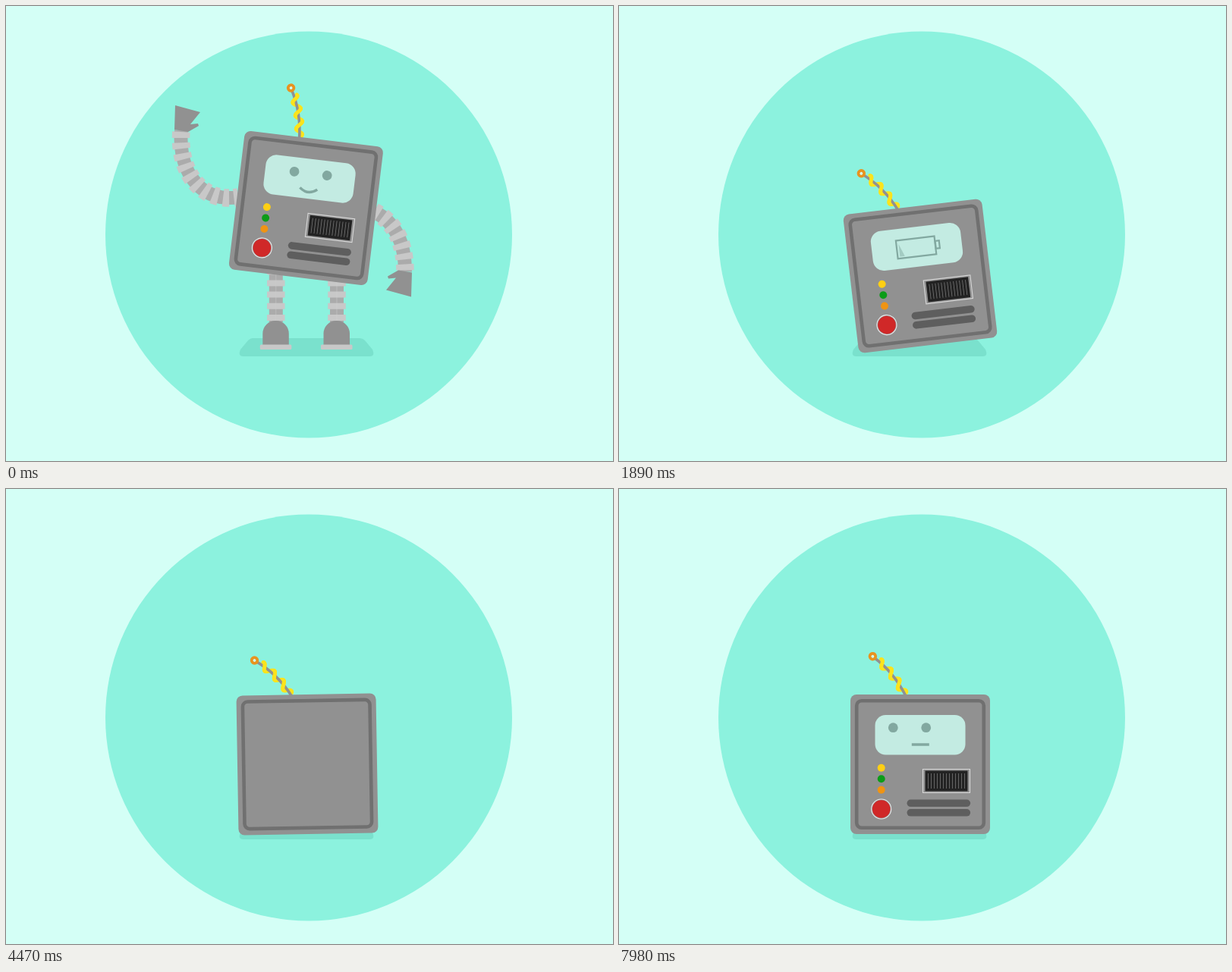
Write an HTML page with a canvas that moves like this. It is 800 px wide and 600 px high and loops after 8000 ms.

```html
<!DOCTYPE html>
<html>
<head>
<meta charset="utf-8">
<title>Robot running out of power</title>
<style>
html, body { margin: 0; width: 100%; height: 100%; overflow: hidden; background: #d4fff6; }
canvas { display: block; }
</style>
</head>
<body>
<canvas id="stage" width="800" height="600"></canvas>
<script>
const g = document.getElementById('stage').getContext('2d');
const LOOP = 8000, RAD = Math.PI / 180;
const GREY = '#919191', TUBE = '#ababab', RING = '#c8c8c8', INK = '#82a8a0';

const clamp = v => Math.max(0, Math.min(1, v));
const mix = (a, b, u) => a + (b - a) * u;
const span = (t, from, to) => clamp((t - from) / (to - from));
const sine = u => (1 - Math.cos(Math.PI * u)) / 2;
const backIn = u => u * u * (3.5 * u - 2.5);

// Eased value through [time, value] pairs
function keys(t, list) {
  let i = 0;
  while (i < list.length - 2 && t > list[i + 1][0]) i++;
  const [a, b] = [list[i], list[i + 1]];
  return mix(a[1], b[1], sine(span(t, a[0], b[0])));
}

function at(x, y, draw, angle = 0, sx = 1, sy = sx) {
  g.save();
  g.translate(x, y);
  g.rotate(angle * RAD);
  g.scale(sx, sy);
  draw();
  g.restore();
}

function fill(color) { g.fillStyle = color; g.fill(); }
function stroke(color, width) { g.strokeStyle = color; g.lineWidth = width; g.stroke(); }
function box(x, y, w, h, r = 0) { g.beginPath(); g.roundRect(x, y, w, h, r); }
function disc(x, y, rx, ry = rx) { g.beginPath(); g.ellipse(x, y, rx, ry, 0, 0, 7); }
function poly(points) {
  g.beginPath();
  points.forEach(p => g.lineTo(...p));
}

function scenery() {
  g.fillStyle = '#d4fff6';
  g.fillRect(0, 0, 800, 600);
  disc(399, 301.5, 268);
  fill('#8cf2de');
  g.beginPath();
  g.moveTo(325, 438);
  g.lineTo(466, 438);
  g.quadraticCurveTo(470, 438, 473, 441);
  g.lineTo(483, 453);
  g.quadraticCurveTo(487, 462, 479, 462);
  g.lineTo(313, 462);
  g.quadraticCurveTo(305, 462, 309, 453);
  g.lineTo(319, 441);
  g.quadraticCurveTo(322, 438, 325, 438);
  fill('#7ae1cd');
}

// Strokes the current path as a ribbed tube
function hose(gap) {
  stroke(TUBE, 18);
  g.setLineDash([8, gap]);
  g.lineDashOffset = -2;
  stroke(RING, 23.5);
  g.setLineDash([]);
}

function arm(p, c, d, wrist, handAngle) {
  g.beginPath();
  g.moveTo(...wrist);
  g.bezierCurveTo(...d, ...c, ...p);
  hose(6.2);
  at(...wrist, () => {
    poly([[-8, -33], [25, -24], [12, -8], [22, -9], [23, -6], [9, 2], [-9, -1]]);
    fill(GREY);
  }, handAngle);
}

function leg(x) {
  g.beginPath();
  g.moveTo(x, 417);
  g.lineTo(x, 335);
  hose(7.2);
  g.fillStyle = 'rgba(210,210,210,.5)';
  g.fillRect(x - .5, 335, 1, 80);
  box(x - 17.5, 415, 34.5, 33, [17, 17, 0, 0]);
  fill(GREY);
  box(x - 21, 446.5, 41.5, 6.5, 1.5);
  fill(RING);
}

function pose(t) {
  if (t < 1620) {
    const k = keys(t, [[0, 1], [870, 0], [1000, 0], [1440, 1.25], [1620, 1]]);
    return { k, x: 395.4, y: 256 + 10.5 * k, tilt: .3 + 6.6 * k };
  }
  if (t < 2430) {
    const tilt = keys(t, [[1620, 6.9], [1890, -6.7], [2070, 4], [2220, -2], [2330, 1], [2430, 0]]);
    const fall = span(t, 1620, 1860);
    const floor = 363 - 60 * Math.abs(Math.sin(tilt * RAD));
    return { k: 1, x: mix(395.4, 397, fall), y: mix(266.5, floor, fall * fall), tilt };
  }
  const shake = (from, to) => {
    const u = span(t, from, to);
    return 2.4 * (1 - .85 * u) * Math.sin(3 * Math.PI * u);
  };
  return { k: 1, x: 397, y: 363, tilt: shake(3570, 3900) + shake(4290, 4740) };
}

function antennaAngle(t) {
  if (t < 2430) return keys(t, [[0, 16], [870, 27.4], [1020, 27.4], [1440, 13], [1620, 16],
    [1980, 42], [2100, 50], [2260, 43], [2430, 46]]);
  const first = span(t, 3570, 3900), second = span(t, 4465, 4740);
  return 46 - 18 * Math.sin(Math.PI * first) - 14 * Math.sin(Math.PI * second) - 6.3 * sine(second);
}

function limbs(t, { k, x, y, tilt }) {
  const q = 1 - sine(span(t, 1620, 1830));
  if (q <= 0) return;
  const c = Math.cos(tilt * RAD), s = Math.sin(tilt * RAD);
  const joint = (a, b) => [x + a * c - b * s, y + a * s + b * c];
  const shrink = (p, draw) => at(...p, () => { g.translate(-p[0], -p[1]); draw(); }, 0, q);

  for (const lx of [355.8, 436]) shrink([lx, y + 80], () => leg(lx));

  const l = joint(-90, -4), r = joint(90, -6);
  const wx = keys(t, [[0, 231], [400, 198], [840, 221], [1020, 225], [1620, 240]]);
  const wy = keys(t, [[0, 164], [400, 172], [1020, 169], [1620, 167]]);
  const wave = keys(t, [[0, 0], [400, -6], [840, 0]]);
  shrink(l, () => arm(l, [l[0] - mix(47, 43, k), l[1] + mix(12, 9, k)],
    [wx - 5, wy + 61], [wx, wy], wave));

  const w = [mix(536, 526, k), mix(325, 350.5, k)];
  shrink(r, () => arm(r, [r[0] + 28, r[1] + mix(6, 14, k)],
    [w[0] - mix(5, 0, k), w[1] - 37], w, 180 - mix(5, 0, k)));
}

function antenna(angle) {
  const bulge = s => 16.8 * (s / 66) * (1 - s / 66);
  const turn = 17.3;
  const coil = (from, to) => {
    g.beginPath();
    for (let s = from; s <= to; s += .5)
      g.lineTo(bulge(s) + 4.3 * Math.cos((s - 3) / turn * 2 * Math.PI), -s);
    stroke('#fbe31c', 5);
  };
  g.lineCap = g.lineJoin = 'round';
  at(-20.5, -91.5, () => {
    coil(1, 56);
    g.beginPath();
    g.moveTo(0, 3);
    g.quadraticCurveTo(8.4, -33, 0, -65);
    stroke(GREY, 3.6);
    for (let i = 0; i < 3; i++) coil(3 + (i + .5) * turn, 3 + (i + 1) * turn);
    disc(0, -66, 3.8);
    fill('#d4fff6');
    stroke('#e8931f', 3.8);
  }, -angle);
  g.lineCap = 'butt';
  g.lineJoin = 'miter';
}

function battery(alpha) {
  g.globalAlpha = alpha;
  box(-26.5, -50, 51, 24);
  stroke(INK, 2.2);
  box(24.8, -43.5, 5.2, 10);
  stroke(INK, 2.2);
  poly([[-23.5, -45], [-23.5, -28.5], [-17, -28.5]]);
  fill('#a3cbc2');
  g.globalAlpha = 1;
}

function face(t) {
  const early = t < 2430;
  const enter = early ? 1 : sine(span(t, 6030, 6330));
  g.globalAlpha = early ? 1 - span(t, 430, 560) : enter;
  if (!g.globalAlpha) { g.globalAlpha = 1; return; }
  const look = sine(span(t, 6990, 7320)), back = sine(span(t, 7680, 7980));
  const blink = from => 1 - .9 * Math.sin(Math.PI * span(t, from, from + 270)) ** 3;
  const dx = 8 * look - 22.7 * back;
  const dy = -2.3 * look - 6.5 * (1 - enter);
  disc(-21 + dx, -46 + dy, 6.4, 6.4 * blink(6540));
  fill(INK);
  disc(22.4 + dx, -46 + dy, 6.4, 6.4 * blink(6510));
  fill(INK);
  g.beginPath();
  g.moveTo(-11.2, -26);
  g.quadraticCurveTo(.4, early ? -16.5 : -26, 11.8, -26);
  stroke(INK, 3.5);
  g.globalAlpha = 1;
}

const lamp = color => () => { disc(0, 0, 5); fill(color); };
const bar = () => { box(-41.8, -4.8, 83.6, 9.6, 4.8); fill('#5e5e5e'); };

function screen() {
  box(-59.5, -26.3, 119, 52.6, 14);
  fill('#c3ebe2');
}

function button() {
  disc(0, 0, 13);
  fill(GREY);
  stroke('#e8e8e8', 1.1);
  disc(0, 0, 11.8);
  fill('#d02828');
}

function speaker() {
  box(-31, -15.5, 62, 31);
  stroke('#d8d8d8', 1.1);
  box(-28, -13.5, 56, 27);
  fill('#222');
  g.fillStyle = '#777';
  for (let x = -24; x <= 24; x += 4) g.fillRect(x - .4, -10, .8, 20);
}

// [x, y, draw, time it starts to leave]
const parts = [
  [24.3, 63.8, bar, 2760],
  [24.3, 51.3, bar, 2750],
  [0, -38.8, screen, 2466],
  [34.5, 22, speaker, 2440],
  [-51.3, 4.8, lamp('#fecf14'), 2755],
  [-51.3, 19.3, lamp('#0c9c18'), 2450],
  [-51.3, 33.8, lamp('#ef9413'), 2435],
  [-51.3, 59, button, 2430]
];

function body(t) {
  box(-92, -92, 184, 184, 8);
  fill(GREY);
  box(-83.8, -83.8, 167.6, 167.6, 6.5);
  stroke('#707070', 4.6);
  parts.forEach(([x, y, draw, leave], i) => {
    const come = 5220 + i * 65;
    const size = t < come ? 1 - backIn(span(t, leave, leave + 300))
                          : 1 - backIn(1 - span(t, come, come + 350));
    if (size > .001) at(x, y, draw, 0, draw === screen ? 1 : size, size);
  });
  face(t);
  const charge = Math.min(span(t, 430, 560), 1 - span(t, 2490, 2640));
  if (charge) battery(charge);
}

function frame(now) {
  const t = now % LOOP, p = pose(t);
  scenery();
  limbs(t, p);
  at(p.x, p.y, () => {
    antenna(antennaAngle(t));
    body(t);
  }, p.tilt);
  requestAnimationFrame(frame);
}

const start = performance.now();
(function tick() {
  const run = frame;
  requestAnimationFrame(now => run(Math.max(0, now - start)));
})();
</script>
</body>
</html>
```
